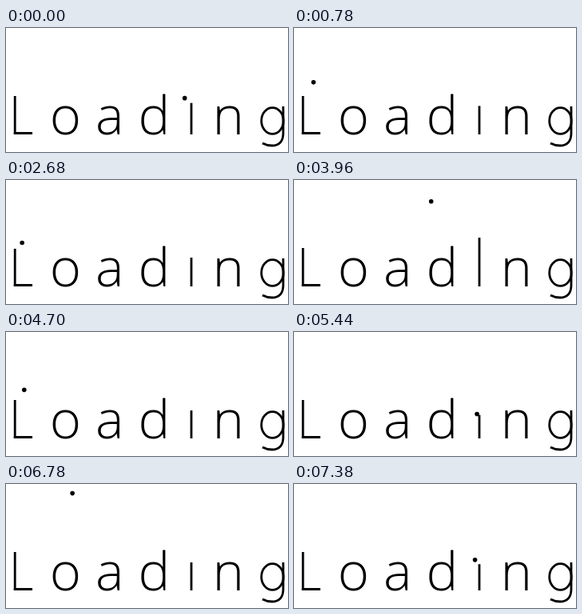
Write an HTML page that moves like this. It is 353 px wide and 155 px high and loops after 7.4 s.

```html
<!DOCTYPE html>
<html lang="en">
<head>
<meta charset="utf-8">
<title>Loading</title>
<style>
  html, body { margin: 0; width: 100%; height: 100%; overflow: hidden; background: #fff; }
  svg { display: block; width: 353px; height: 155px; }
  text { font: 300 67px "Open Sans", "Noto Sans", sans-serif; text-anchor: middle; }
  .tail { fill: none; stroke: #000; stroke-width: 2.8; }
</style>
</head>
<body>
<svg viewBox="0 0 353 155" role="img" aria-label="Loading">
  <rect id="post" x="9.8"/>
  <rect x="9.8" y="130" width="23.2" height="3"/>
  <text x="74.5" y="133">o</text>
  <text x="129.7" y="133">a</text>
  <text x="185.4" y="133">d</text>
  <rect id="stem" x="230.6"/>
  <text x="278.2" y="133">n</text>
  <path class="tail" d="M347 98V131.500C347 141.500 342 147 333 147Q326.500 147 321 144"/>
  <ellipse class="tail" cx="333.5" cy="116" rx="13.8" ry="16.4"/>
  <circle id="dot" r="2.8"/>
</svg>
<script>
  const LOOP = 7400, BOUNCES = 4, BASE = 133, CAP = 85, X_HEIGHT = 35;
  const [post, stem, dot] = ["post", "stem", "dot"].map(id => document.getElementById(id));
  const clamp = v => Math.min(1, Math.max(0, v));
  const mix = (a, b, k) => a + (b - a) * clamp(k);

  // One bounce is i to L and back; the first ones run a little late.
  function phaseAt(ms) {
    const u = ms / LOOP;
    return (.044 + BOUNCES * u - .55 * u * (1 - u) ** 3) % 1;
  }

  // The i springs up, holds, then settles like a damped spring.
  function stretch(phase) {
    if (phase < .28) return mix(.35, 1.74, phase / .08);
    if (phase > .97) return mix(1, .35, (phase - .97) / .03);
    const u = phase - .28;
    return 1 + .74 * Math.exp(-19 * u) * Math.cos(35 * u);
  }

  function dotAt(phase) {
    const s = 1 - Math.abs(1 - 2 * phase), a = Math.PI * s;
    const x = 126.5 + 106 * Math.cos(a) - 17 * Math.sin(a);
    return [x - mix(0, 8, (s - .86) / .14), 118 - 110 * Math.sin(a)];
  }

  function setBar(bar, top, width) {
    bar.setAttribute("y", top);
    bar.setAttribute("height", BASE - top);
    bar.setAttribute("width", width);
  }

  function draw() {
    const phase = phaseAt(performance.now() % LOOP);
    const [x, y] = dotAt(phase);
    dot.setAttribute("cx", x);
    dot.setAttribute("cy", y);
    setBar(stem, BASE - X_HEIGHT * stretch(phase), 2.8);
    setBar(post, mix(121, CAP, Math.abs(phase - .5) / .06), 2.8);
    requestAnimationFrame(draw);
  }
  draw();
</script>
</body>
</html>
```
